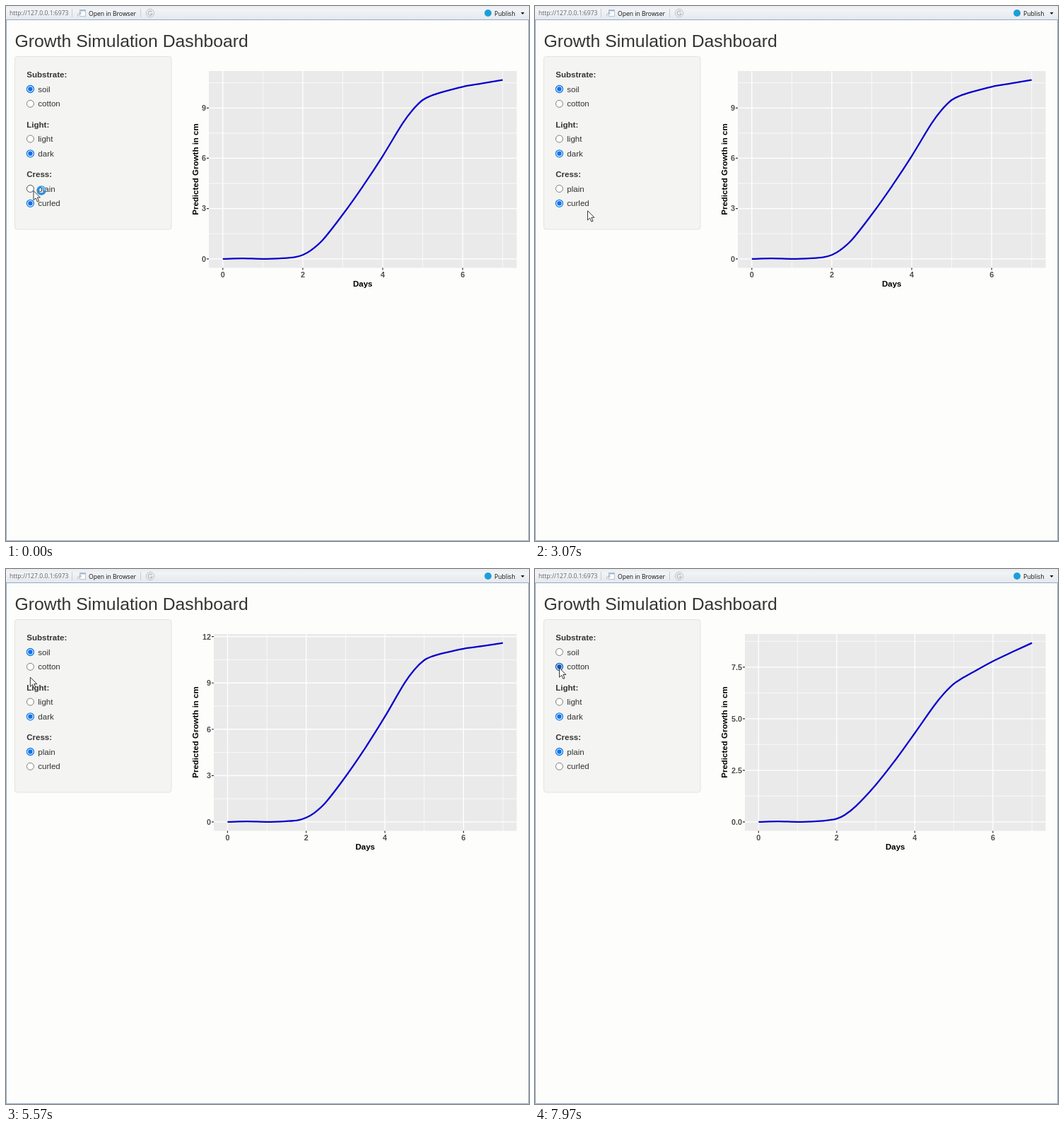
These frames come from a looping animation (740x757 px, 8 s). An HTML page:

```html
<!DOCTYPE html>
<html lang="en">
<head>
<meta charset="utf-8">
<title>Growth Simulation Dashboard</title>
<style>
  html, body { margin: 0; width: 100%; height: 100%; overflow: hidden; background: #fdfdfb; }
  svg { display: block; width: 740px; height: 757px; font: 11.55px "Liberation Sans", Arial, sans-serif; fill: #333; }
  .bar { font: 8.6px "Open Sans", sans-serif; fill: #111; }
  .bold { font-weight: bold; }
  .axis { font-weight: bold; fill: #000; text-anchor: middle; }
  .tick { font-size: 10.8px; font-weight: bold; fill: #4d4d4d; }
</style>
</head>
<body>
<svg viewBox="0 0 740 757">
  <defs>
    <linearGradient id="barFill" x2="0" y2="1">
      <stop offset="0" stop-color="#e9ecf0"/>
      <stop offset=".3" stop-color="#f1f3f6"/>
      <stop offset="1" stop-color="#e6e9ed"/>
    </linearGradient>
  </defs>

  <rect width="740" height="757" fill="#fdfdfb"/>
  <rect width="740" height="19" fill="url(#barFill)"/>
  <path d="M0 19.5H739.5V756.5H.5V19.5" fill="none" stroke="#91abcb"/>
  <g class="bar">
    <text x="5" y="13" fill="#666">http://127.0.0.1:6973</text>
    <path d="M93.5 4V16M190.5 4V16" stroke="#c9cdd2"/>
    <rect x="104.5" y="5.5" width="8" height="9" fill="#fff" stroke="#b6c4d3"/>
    <path d="M104.5 6.5H112.5" stroke="#a4b9d0" stroke-width="2"/>
    <path d="M101.5 14.5C101.5 11 103 10 106 10M104 8L106.5 10L104 12" fill="none" stroke="#9fb2c6"/>
    <text x="117" y="14">Open in Browser</text>
    <circle cx="204" cy="10" r="5.8" fill="#eceef0" stroke="#c3c6ca"/>
    <path d="M206.5 8.3A3 3 0 1 0 207 11H204.5" fill="none" stroke="#b3b7bc" stroke-width="1.2"/>
    <circle cx="682" cy="10" r="5" fill="#1c9fd9"/>
    <text x="691" y="14">Publish</text>
    <path d="M728.5 9H733.5L731 12Z"/>
  </g>

  <text x="12.6" y="58" font-size="24.75">Growth Simulation Dashboard</text>
  <rect x="12.5" y="71.5" width="221.5" height="244.5" rx="3.3" fill="#f4f4f2" stroke="#e4e4da"/>
  <g id="form"></g>
  <g id="plot"></g>
  <g id="cursor">
    <path d="M0 0V13.2L3.1 10.3L5.4 15.4L7.5 14.4L5.3 9.5H9.4Z" fill="#fff" stroke="#222" stroke-width=".9"/>
    <g id="busy" transform="translate(11 -.5)">
      <circle r="5" fill="none" stroke="#2f8fdc" stroke-width="3.4"/>
      <path id="spinner" d="M0-5A5 5 0 0 1 5 0" fill="none" stroke="#8ccaf2" stroke-width="2.2"/>
    </g>
  </g>
</svg>

<script>
const LOOP = 8000;
const el = id => document.getElementById(id);
const line = (d, color, width) => `<path d="${d}" fill="none" stroke="${color}" stroke-width="${width}"/>`;
const text = (x, y, label, attrs = '') => `<text x="${x}" y="${y}" ${attrs}>${label}</text>`;

const groups = [
  { name: 'Substrate', y: 97, options: ['soil', 'cotton'] },
  { name: 'Light', y: 167.5, options: ['light', 'dark'] },
  { name: 'Cress', y: 238, options: ['plain', 'curled'] },
];

// Growth is given as a share of the final height on each of these days.
const days = [0, .5, 1, 1.5, 1.8, 2, 2.2, 2.5, 3, 3.5, 4, 4.5, 4.75, 5, 5.2, 5.5, 6, 6.5, 7];
const start = [0, .003, 0, .004, .01];
const scenarios = {
  curled: {
    left: 287, max: 10.67, step: 3, digits: 0,
    growth: [...start, .022, .047, .106, .248, .405, .575, .758, .833, .888, .911, .933, .962, .981, 1],
  },
  plain: {
    left: 294, max: 11.59, step: 3, digits: 0,
    growth: [...start, .024, .049, .11, .253, .413, .588, .776, .851, .904, .925, .944, .968, .983, 1],
  },
  cotton: {
    left: 297, max: 8.67, step: 2.5, digits: 1,
    growth: [...start, .018, .038, .09, .207, .345, .496, .651, .718, .772, .801, .838, .898, .95, 1],
  },
};

const cursorKeys = [
  [0, 39, 261.5], [300, 39, 261.5], [700, 37, 258], [1350, 37, 258], [1950, 197, 374],
  [2600, 197, 374], [3300, 33.5, 261.5], [5000, 33.5, 261.5], [5750, 34.5, 135],
  [6700, 34.5, 135], [7100, 34.5, 140],
];

function smoothPath(points) {
  const at = i => points[Math.max(0, Math.min(points.length - 1, i))];
  let d = `M${points[0]}`;
  for (let i = 0; i < points.length - 1; i++) {
    const [a, b, c, e] = [at(i - 1), at(i), at(i + 1), at(i + 2)];
    const span = c[0] - b[0];
    const slope = (p, q) => (q[1] - p[1]) / (q[0] - p[0]);
    d += `C${b[0] + span / 3},${b[1] + slope(a, c) * span / 3}`
       + ` ${c[0] - span / 3},${c[1] - slope(b, e) * span / 3} ${c}`;
  }
  return d;
}

function drawPlot({ left, max, step, digits, growth }) {
  const right = 722.5, top = 92, bottom = 370.5;
  const width = right - left, height = bottom - top;
  const px = day => left + width * (.05 + day / 7) / 1.1 - width * .05 / 1.1 + width * .05 / 1.1 - (width * .05 / 1.1 - width * .05 / 1.1);
  const x = day => left + width * (.05 + day / 7) / 1.1;
  const y = share => bottom - height * (.05 + share) / 1.1;
  let minor = '', major = '', ticks = '', labels = '';

  for (let day = 0; day <= 7; day++) {
    const grid = `M${x(day)} ${top}V${bottom}`;
    if (day % 2) { minor += grid; continue; }
    major += grid;
    ticks += `M${x(day)} ${bottom}v3`;
    labels += text(x(day), 383.5, day, 'class="tick" text-anchor="middle"');
  }
  for (let i = 0; i * step / 2 < max * 1.05; i++) {
    const value = i * step / 2, rowY = y(value / max);
    const grid = `M${left} ${rowY}H${right}`;
    if (i % 2) { minor += grid; continue; }
    major += grid;
    ticks += `M${left} ${rowY}h-3`;
    labels += text(left - 4, rowY + 3.8, value.toFixed(digits), 'class="tick" text-anchor="end"');
  }

  const curve = smoothPath(days.map((day, i) => [x(day), y(growth[i])]));
  return `<rect x="${left}" y="${top}" width="${width}" height="${height}" fill="#eaeaea"/>`
    + line(minor, '#fff', .7) + line(major, '#fff', 1.3) + line(ticks, '#333', 1.2)
    + line(curve, '#0800cd', 2.3) + labels
    + text((left + right) / 2, 397, 'Days', 'class="axis"')
    + text(0, 0, 'Predicted Growth in cm', 'class="axis" transform="translate(271.5 231) rotate(-90)"');
}

function drawRadio(y, label, checked, hovered) {
  const color = checked ? (hovered ? '#0655b5' : '#0f74e6') : (hovered ? '#444' : '#767676');
  return `<circle cx="34.4" cy="${y}" r="5" fill="#fff" stroke="${color}" stroke-width="${checked ? 1.3 : .95}"/>`
    + (checked ? `<circle cx="34.4" cy="${y}" r="3.2" fill="${color}"/>` : '')
    + text(45.3, y + 4, label);
}

function drawForm(selected, [cx, cy]) {
  return groups.map(({ name, y, options }) =>
    text(29.2, y + 4, name + ':', 'class="bold"') + options.map((option, i) => {
      const rowY = y + 20.5 + i * 20.8;
      const hovered = Math.abs(cy - rowY) < 8 && cx > 28 && cx < 78;
      return drawRadio(rowY, option, selected.includes(option), hovered);
    }).join('')).join('');
}

function cursorAt(t) {
  const next = cursorKeys.findIndex(key => key[0] > t);
  if (next < 0) return cursorKeys.at(-1).slice(1);
  const [t0, x0, y0] = cursorKeys[next - 1], [t1, x1, y1] = cursorKeys[next];
  const u = (t - t0) / (t1 - t0), ease = u * u * (3 - 2 * u);
  return [x0 + (x1 - x0) * ease, y0 + (y1 - y0) * ease];
}

const plots = Object.fromEntries(Object.entries(scenarios).map(([name, s]) => [name, drawPlot(s)]));
let shownPlot, shownForm;

function render(now) {
  const t = now % LOOP;
  const cursor = cursorAt(t);
  const selected = [t < 7510 ? 'soil' : 'cotton', 'dark', t < 4200 ? 'curled' : 'plain'];
  const plot = t < 4400 ? 'curled' : t < 7750 ? 'plain' : 'cotton';
  const form = drawForm(selected, cursor);

  if (plot !== shownPlot) el('plot').innerHTML = plots[shownPlot = plot];
  if (form !== shownForm) el('form').innerHTML = shownForm = form;
  el('cursor').setAttribute('transform', `translate(${cursor})`);
  el('busy').setAttribute('visibility', t < 400 ? 'visible' : 'hidden');
  el('spinner').setAttribute('transform', `rotate(${t * .36})`);
  requestAnimationFrame(render);
}
render(0);
</script>
</body>
</html>
```
